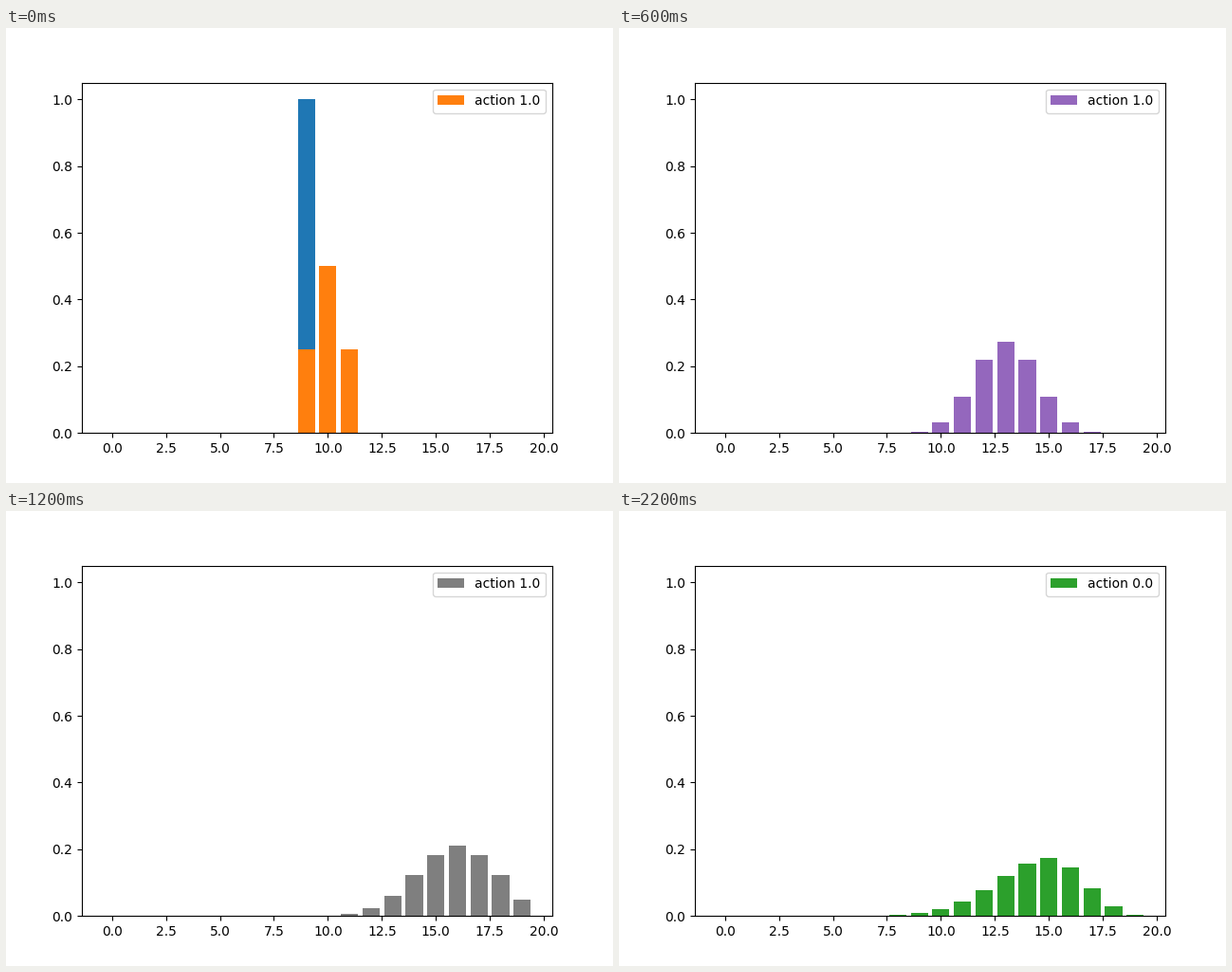
Write a matplotlib script that moves like this. It is 640 px wide and 480 px high and loops after 2400 ms.

```python
import numpy as np
import matplotlib.pyplot as plt
from matplotlib.animation import FuncAnimation

STATES = 20
START = 9
ACTIONS = [1] * 9 + [0] * 3
STEP_MS = 200


def transition(action):
    """Matrix T[s, s2]: stay 1/4, move one 1/2, move two 1/4, with end walls."""
    T = np.zeros((STATES, STATES))
    for s in range(STATES - 2):
        T[s, s:s + 3] = 0.25, 0.5, 0.25
    T[-3, -1] = 0  # a double move never lands on the wall
    T[-2, -2:] = 0.25, 0.75
    T[-1, -1] = 1
    return T if action else T[::-1, ::-1]


def beliefs():
    b = np.eye(STATES)[START]
    out = [b]
    for a in ACTIONS:
        b = b @ transition(a)
        out.append(b)
    return out


history = beliefs()

plt.rcParams["font.family"] = "DejaVu Sans"
fig, ax = plt.subplots(figsize=(6.4, 4.8), dpi=100)
states = np.arange(STATES)
first = ax.bar(states, history[0], color="C0")
bars = ax.bar(states, history[1], color="C1", label="action 1.0")
ax.set_xlim(-1.39, 20.39)
ax.set_ylim(0, 1.05)
legend = ax.legend(handles=[bars], loc="upper right")
swatch = legend.get_patches()[0]
caption = legend.get_texts()[0]


def update(i):
    color = f"C{(i + 1) % 10}"
    for bar, p in zip(bars, history[i + 1]):
        bar.set_height(p)
        bar.set_facecolor(color)
    for bar in first:
        bar.set_visible(i == 0)
    swatch.set_facecolor(color)
    caption.set_text(f"action {ACTIONS[i]:.1f}")
    return [*first, *bars, legend]


anim = FuncAnimation(fig, update, frames=len(ACTIONS), interval=STEP_MS,
                     repeat=True, repeat_delay=0, blit=False)
plt.show()
```
